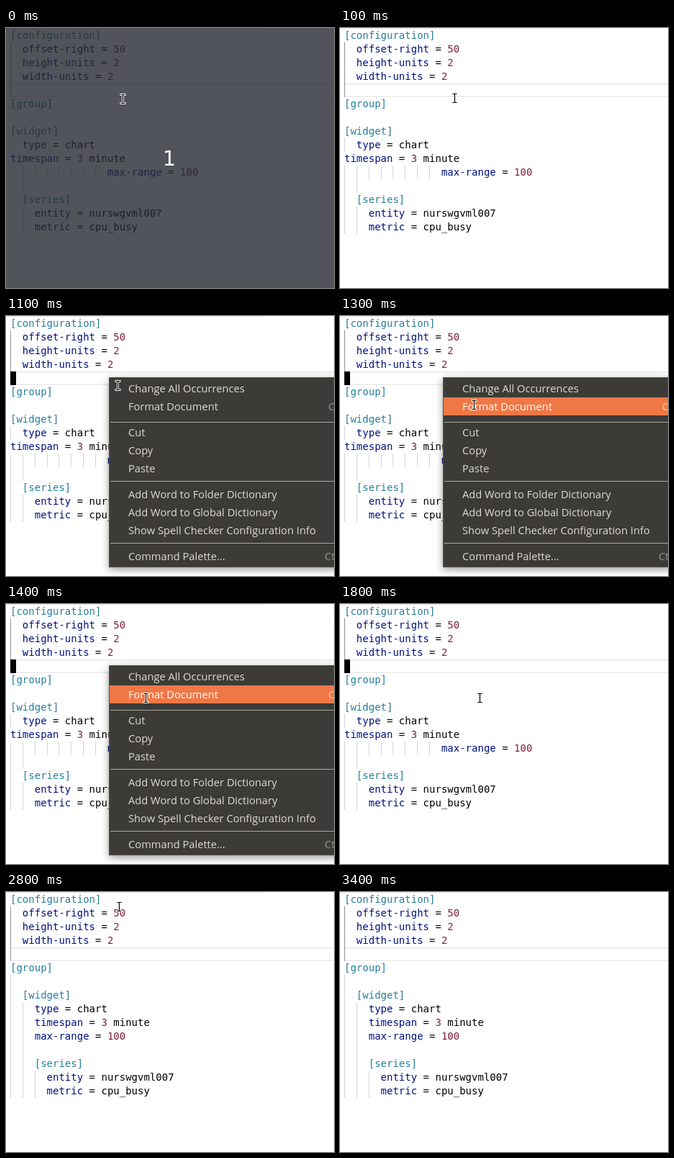
An HTML page with a canvas that plays this animation: 456x361 px, repeating every 3700 ms.

```html
<!DOCTYPE html>
<html lang="en">
<head>
<meta charset="utf-8">
<style>
  html, body { margin: 0; width: 456px; height: 361px; overflow: hidden; background: #fff; }
  canvas { display: block; }
</style>
</head>
<body>
<canvas id="stage" width="456" height="361"></canvas>
<script>
const ctx = document.getElementById('stage').getContext('2d');
const W = 456, H = 361, LOOP = 3700, STEP = 100;
const LEFT = 6, TOP = 1, ROW = 19, COL = 8.43, CARET_ROW = 4;

const head = ['[configuration]', '  offset-right = 50', '  height-units = 2',
  '  width-units = 2', '  ', '[group]'];
const messy = [...head, '', '[widget]', '  type = chart', 'timespan = 3 minute',
  ' '.repeat(16) + 'max-range = 100', '    ', '  [series]',
  '    entity = nurswgvml007', '    metric = cpu_busy'];
const tidy = [...head, '  ', '  [widget]', '    type = chart', '    timespan = 3 minute',
  '    max-range = 100', '    ', '    [series]',
  '      entity = nurswgvml007', '      metric = cpu_busy'];

// [label, centre y, shortcut, shortcut x]
const items = [
  ['Change All Occurrences', 101], ['Format Document', 126, 'Ctrl+Shift+I', 448],
  ['Cut', 162], ['Copy', 187], ['Paste', 212],
  ['Add Word to Folder Dictionary', 248], ['Add Word to Global Dictionary', 273],
  ['Show Spell Checker Configuration Info', 298],
  ['Command Palette...', 334, 'Ctrl+Shift+P', 443]
];

// [time, x, y]; the pointer jumps from one place to the next
const pointer = [
  [0, 162, 99], [100, 159, 98], [200, 155, 97],
  [1200, 166, 108], [1300, 186, 124], [1400, 194, 131],
  [2100, 203, 134], [2200, 217, 139], [2300, 225, 141],
  [2400, 214, 124], [2500, 190, 95], [2600, 169, 70],
  [2700, 163, 48], [2800, 157, 21], [2900, -20, -20]
];

const within = (t, from, to) => t >= from && t < to;

function rect(x, y, w, h, color) {
  ctx.fillStyle = color;
  ctx.fillRect(x, y, w, h);
}

function text(str, x, y, color) {
  ctx.fillStyle = color;
  ctx.fillText(str, x, y);
}

function tokenColor(token) {
  if (token[0] === '[') return '#267f99';
  if (/^\d+$/.test(token)) return '#811f3f';
  return /^[a-z-]+(?= =)/.test(token) ? '#001080' : '#000';
}

function drawLine(line, row) {
  const y = TOP + row * ROW;
  const indent = line.match(/^ */)[0].length;
  const active = row > 0 && row <= CARET_ROW;
  for (let c = 0; c < indent; c += 2)
    rect(Math.round(LEFT + c * COL), y, 1, ROW, active ? '#939393' : '#d3d3d3');
  for (const m of line.matchAll(/\S+/g)) {
    const isKey = line.slice(m.index + m[0].length).startsWith(' =');
    text(m[0], LEFT + m.index * COL, y + 14, tokenColor(m[0] + (isKey ? ' =' : '')));
  }
}

function drawEditor(lines, caretOn) {
  rect(0, 0, W, H, '#fff');
  rect(0, 0, 360, 1, '#e4e4e4');
  const y = TOP + CARET_ROW * ROW;
  rect(LEFT, y, W, 2, '#eee');
  rect(LEFT, y + ROW - 2, W, 2, '#eee');
  ctx.font = '14px "DejaVu Sans Mono", monospace';
  lines.forEach(drawLine);
  if (caretOn) rect(LEFT, y, 8, ROW, '#000');
}

function drawMenu(selected) {
  ctx.save();
  ctx.shadowColor = 'rgba(0,0,0,.4)';
  ctx.shadowBlur = 10;
  ctx.shadowOffsetY = 3;
  rect(143, 85, W, 264, '#55534e');
  ctx.restore();
  rect(144, 86, W, 262, '#3c3b37');
  for (const y of [147, 229, 315]) rect(145, y, W, 1, '#aaa79f');
  ctx.font = '14.7px "Open Sans", sans-serif';
  items.forEach(([label, y, keys, keysX], i) => {
    const on = i === selected;
    if (on) rect(144, y - 13, W, 25, '#f07746');
    text(label, 170, y + 5, on ? '#fff' : '#dfdbd2');
    if (keys) text(keys, keysX, y + 5, on ? '#f9d0bd' : '#96938b');
  });
}

function drawCountdown() {
  rect(0, 0, W, H, 'rgba(38,42,49,.8)');
  ctx.font = '29px "DejaVu Sans", sans-serif';
  ctx.textAlign = 'center';
  text('1', 227, 191, '#fff');
  ctx.textAlign = 'left';
}

function drawPointer(x, y) {
  ctx.save();
  ctx.translate(x + .5, y - .5);
  ctx.lineCap = 'square';
  for (const [width, color] of [[3, '#fff'], [1.2, '#000']]) {
    ctx.lineWidth = width;
    ctx.strokeStyle = color;
    ctx.beginPath();
    for (const end of [-6, 6]) {
      ctx.moveTo(-2.5, end);
      ctx.lineTo(2.5, end);
    }
    ctx.moveTo(0, -6);
    ctx.lineTo(0, 6);
    ctx.stroke();
  }
  ctx.restore();
}

function draw(now) {
  const t = Math.floor(now % LOOP / STEP) * STEP;
  const caretOn = within(t, 500, 2400) || within(t, 2900, 3400);
  drawEditor(t < 1900 ? messy : tidy, caretOn);
  if (within(t, 1100, 1800)) drawMenu(t < 1200 ? -1 : t < 1300 ? 0 : 1);
  if (t < 100) drawCountdown();
  const [, x, y] = pointer.findLast(p => p[0] <= t);
  drawPointer(x, y);
}

const start = performance.now();
(function tick() {
  draw(performance.now() - start);
  requestAnimationFrame(tick);
})();
</script>
</body>
</html>
```
